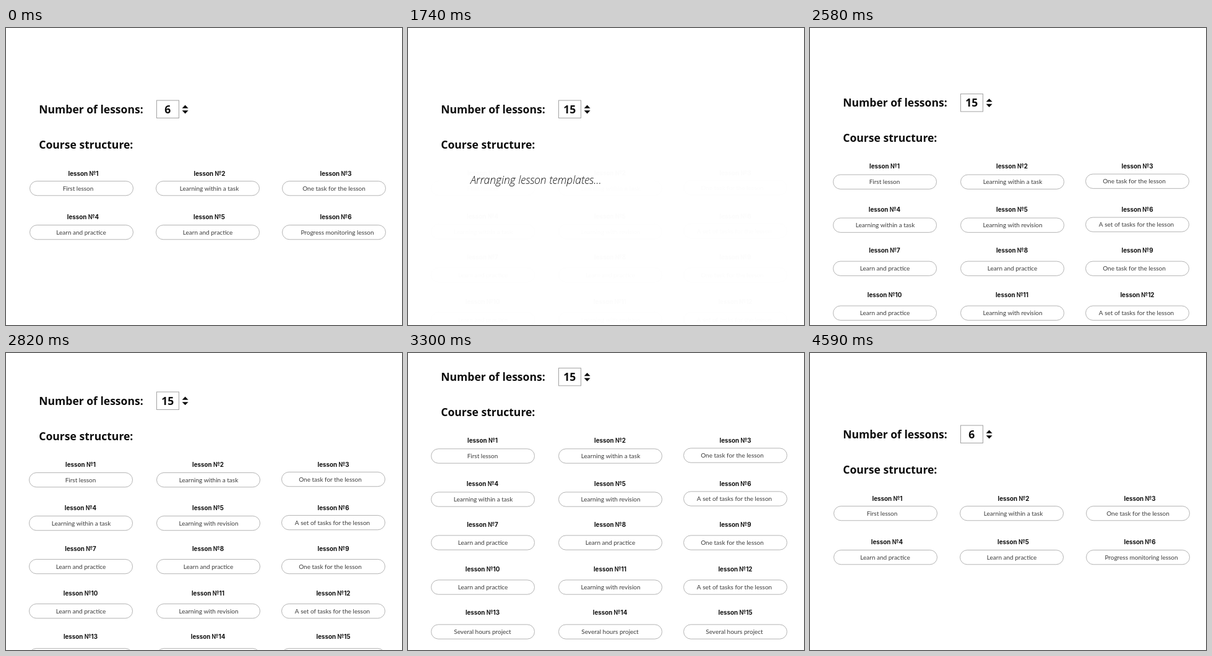
These frames come from a looping animation (640 by 480 pixels, 4.62 s). An HTML page with a canvas:

```html
<!DOCTYPE html>
<html lang="en">
<head>
<meta charset="utf-8">
<title>Course structure</title>
<style>
  html, body { margin: 0; width: 100%; height: 100%; overflow: hidden; background: #fff; }
  canvas { display: block; }
</style>
</head>
<body>
<canvas id="stage" width="640" height="480"></canvas>
<script>
const W = 640, H = 480, LOOP = 4620, STEP = 30;
const SCROLL = 96.2;

const HEADING = 'bold 17.55px "Open Sans", "Noto Sans", sans-serif';
const STATUS = 'italic 300 17.5px "Open Sans", "Noto Sans", sans-serif';
const LABEL = 'bold 9.8px Inter, "Noto Sans", sans-serif';
const TEMPLATE = '10px Lato, "Open Sans", sans-serif';

const stage = document.getElementById('stage').getContext('2d');
const layer = document.createElement('canvas');
layer.width = W;
layer.height = H;
const overlay = layer.getContext('2d');

// Each cell: template name and the centre of its text.
const shortCourse = {
  labelX: [[125, 329, 533], [124.5, 328.5, 533]],
  labelY: [235, 305],
  pillX: [38, 242, 446],
  pillY: [[259, 259, 259], [330, 330, 330]],
  rows: [
    [['First lesson', 116.5], ['Learning within a task', 328.5], ['One task for the lesson', 530]],
    [['Learn and practice', 121.5], ['Learn and practice', 326], ['Progress monitoring lesson', 535.5]]
  ]
};

const longCourse = {
  labelX: Array(5).fill([120.5, 326.5, 529]),
  labelY: [234.2, 304.2, 370, 442, 512.4],
  pillX: [37, 243, 445],
  pillY: [[259, 259, 258], [329, 329, 328], [399, 399, 399], [471, 471, 471], [543, 543, 543]],
  rows: [
    [['First lesson', 120.5], ['Learning within a task', 327.5], ['One task for the lesson', 524]],
    [['Learning within a task', 121.5], ['Learning with revision', 327.5], ['A set of tasks for the lesson', 527.5]],
    [['Learn and practice', 121], ['Learn and practice', 327], ['One task for the lesson', 524]],
    [['Learn and practice', 121], ['Learning with revision', 327.5], ['A set of tasks for the lesson', 527.5]],
    [['Several hours project', 120.5], ['Several hours project', 326.5], ['Several hours project', 527.5]]
  ]
};

function write(ctx, text, x, y, font, color, align = 'center') {
  ctx.font = font;
  ctx.fillStyle = color;
  ctx.textAlign = align;
  ctx.fillText(text, x, y);
}

function arrow(ctx, y, tip) {
  ctx.beginPath();
  ctx.moveTo(284.6, y);
  ctx.lineTo(294.6, y);
  ctx.lineTo(289.6, tip);
  ctx.fill();
}

function drawHeader(ctx, count) {
  write(ctx, 'Number of lessons:', 53.3, 137.6, HEADING, '#0c0c0c', 'left');
  write(ctx, 'Course structure:', 53.3, 194.6, HEADING, '#0c0c0c', 'left');
  ctx.strokeStyle = '#a2a2a2';
  ctx.lineWidth = 1;
  ctx.strokeRect(243.5, 117, 36, 28.5);
  write(ctx, count, 261.2, 137.6, HEADING, '#0c0c0c');
  arrow(ctx, 129.8, 124.6);
  arrow(ctx, 133.2, 138.4);
}

function drawCourse(ctx, course) {
  course.rows.forEach((row, r) => row.forEach(([name, textX], c) => {
    const y = course.pillY[r][c];
    write(ctx, `lesson №${r * 3 + c + 1}`, course.labelX[r][c], course.labelY[r] + 3.6, LABEL, '#101010');
    ctx.strokeStyle = '#b4b4b4';
    ctx.lineWidth = 1;
    ctx.beginPath();
    ctx.roundRect(course.pillX[c] + 0.5, y - 11.5, 167, 23.3, 11.65);
    ctx.stroke();
    write(ctx, name, textX, y + 3.6, TEMPLATE, '#3c3c3c');
  }));
}

function drawScene(ctx, scene, scroll) {
  ctx.fillStyle = '#fff';
  ctx.fillRect(0, 0, W, H);
  ctx.save();
  ctx.translate(0, -scroll);
  drawHeader(ctx, scene === 'short' ? '6' : '15');
  if (scene === 'short') drawCourse(ctx, shortCourse);
  if (scene === 'long') drawCourse(ctx, longCourse);
  if (scene === 'wait') write(ctx, 'Arranging lesson templates...', 101, 252.2, STATUS, '#101010', 'left');
  ctx.restore();
}

const progress = (t, from, to) => Math.min(1, Math.max(0, (t - from) / (to - from)));
const smooth = p => (1 - Math.cos(Math.PI * p)) / 2;

// Cubic Bézier easing (0.4, 0, 0.2, 1), solved by bisection.
function glide(p) {
  let low = 0, high = 1, s = 0.5;
  for (let i = 0; i < 24; i++) {
    s = (low + high) / 2;
    const x = 1.2 * s * (1 - s) ** 2 + 0.6 * s * s * (1 - s) + s ** 3;
    if (x < p) low = s; else high = s;
  }
  return s * s * (3 - 2 * s);
}

const fades = [
  { from: 420, to: 870, before: 'short', after: 'wait' },
  { from: 1710, to: 2250, before: 'wait', after: 'long' },
  { from: 4110, to: 4590, before: 'long', after: 'short' }
];

function render(t) {
  const fade = fades.find(f => t < f.to) || fades[fades.length - 1];
  const mix = smooth(progress(t, fade.from, fade.to));
  const scroll = SCROLL * glide(progress(t, 2350, 3600));
  const offset = scene => scene === 'long' ? scroll : 0;

  drawScene(stage, fade.before, offset(fade.before));
  if (mix > 0) {
    drawScene(overlay, fade.after, offset(fade.after));
    stage.globalAlpha = mix;
    stage.drawImage(layer, 0, 0);
    stage.globalAlpha = 1;
  }
}

const start = performance.now();
function tick() {
  const t = (performance.now() - start) % LOOP;
  render(Math.floor(t / STEP) * STEP);
  requestAnimationFrame(tick);
}
tick();
</script>
</body>
</html>
```
